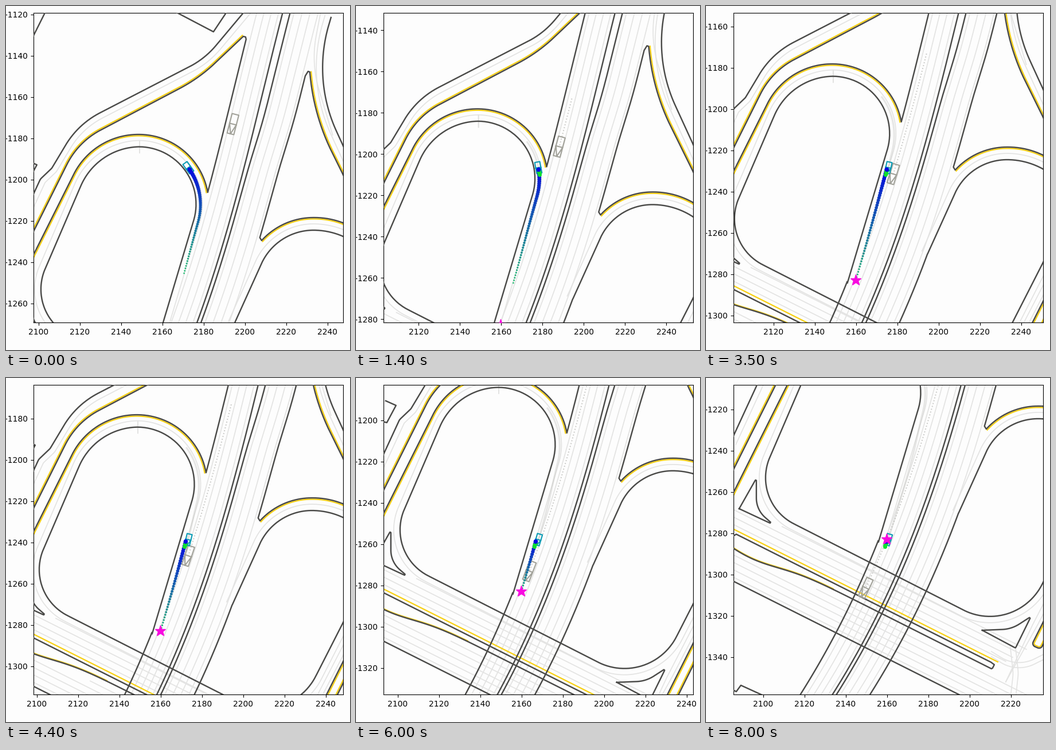
A matplotlib script that plays this animation: 600 px wide and 600 px high, repeating every 8100 ms.

```python
import numpy as np
import matplotlib.pyplot as plt
from matplotlib.animation import FuncAnimation

FRAMES, INTERVAL = 81, 100
SCALE, SPAN = 3.6, 75          # map units per metre, half view in metres
PAPER, EDGE, YELLOW, LANE = "#fdfdfd", "#4a4a48", "#f8d010", "#e3e3e2"


def world(points):
    """Map units (y down) to metres."""
    p = np.asarray(points, float)
    return np.stack([2084.17 + p[..., 0] / SCALE, -1115.87 - p[..., 1] / SCALE], -1)


def unit(v):
    return v / np.maximum(np.linalg.norm(v, axis=-1, keepdims=True), 1e-9)


def rounded(corners, radii):
    """Polyline whose inner corners are arcs of the given radii."""
    p = np.asarray(corners, float)
    out = [p[:1]]
    for a, b, c, r in zip(p, p[1:], p[2:], radii):
        d, e = unit(b - a), unit(c - b)
        turn = np.arctan2(d[0] * e[1] - d[1] * e[0], d @ e)
        n = np.sign(turn) * np.array([-d[1], d[0]])
        start = b - d * r * np.tan(abs(turn) / 2)
        th = np.linspace(0, abs(turn), 30)[:, None]
        out.append(start + r * (n * (1 - np.cos(th)) + d * np.sin(th)))
    p = np.vstack(out + [p[-1:]])
    s = np.r_[0, np.cumsum(np.hypot(*np.diff(p, axis=0).T))]
    t = np.linspace(0, s[-1], int(s[-1] / 2) + 2)
    return np.c_[np.interp(t, s, p[:, 0]), np.interp(t, s, p[:, 1])]


def offset(path, d):
    """Shift a path to the right of its direction of travel."""
    g = unit(np.gradient(path, axis=0))
    return path + np.reshape(d, (-1, 1)) * np.c_[-g[:, 1], g[:, 0]]


# The main road bends gently: its left median edge is a cubic in v.
MEDIAN = np.polyfit([12, 206, 404, 597, 872], [483, 433, 384, 315, 178], 3)


def road(v, shift=0):
    return np.c_[np.polyval(MEDIAN, v) + shift, v]


def right_road(v, shift=0):
    return road(v, 10 - 3 * np.tanh((v - 240) / 50) + shift)


def along(a, b):
    return np.linspace(a, b, int(abs(b - a) / 4) + 2)


def cross_road(x, height):
    return np.c_[x, height + 0.5025 * np.asarray(x)]


fig = plt.figure(figsize=(6, 6), dpi=100, facecolor=PAPER)
ax = fig.add_axes([0.08, 0.08, 0.9, 0.9], facecolor=PAPER)


def line(path, color, width, z, **kw):
    return ax.plot(*world(path).T, color=color, lw=width, zorder=z, **kw)[0]


def edge(*paths):
    line(np.vstack(paths), EDGE, 1.75, 3)


def stripe(path):
    line(path, YELLOW, 1.6, 2)


def lane(path):
    line(path, LANE, 1.2, 1)


# Ramps and loops
ramp_out = rounded([(0, 432), (60, 302), (80, 283), (126, 206), (347, 92), (430, -7)],
                   [15, 15, 150, 150])
ramp_in = rounded([(0, 490), (126, 237), (337, 126), (414, 53)], [137, 280])
loop_out = rounded([(0, 530), (153, 224), (333, 224), (352, 325)], [126, 122])
loop_in = rounded([(258, 606), (366, 245.5), (160, 245.5), (35, 536), (497, 771),
                   (630, 510)], [100, 113, 90, 102])
exit_in = rounded([(530, 115), (538, 193), (625, 369)], [385])
exit_out = rounded([(567, 20), (535, 128), (625, 324)], [265])
east_out = rounded([(446, 409), (482, 369), (596, 369), (650, 423)], [122, 140])
east_in = rounded([(398, 555), (472, 391), (590, 391), (640, 441)], [100, 130])

edge(ramp_out)
edge(loop_out, road(along(322, 58), -52), [(418, 54)], ramp_in[::-1])
edge(loop_in)
edge(exit_in[::-1], [(527, 114)], right_road(along(122, 404), 54), east_out)
edge(exit_out)
edge(right_road(along(890, 556), 58.5), east_in)
for path, d in ((ramp_in, -2.4), (loop_out, 2.4), (exit_in, -2.4), (east_out, 2.4)):
    stripe(offset(path, d))
for path, d in ((ramp_out, 10), (loop_in, 11), (exit_out, 11), (east_in, -11)):
    lane(offset(path, d))

# Main road
whole = along(-10, 900)
edge(road(whole))
edge(right_road(whole))
edge(road(along(604, 900), -56))
for k in range(4):
    lane(road(whole, -7 - 12.7 * k))
    lane(right_road(whole, 7 + 14 * k))
lane(rounded([(552, -5), (532, 100), (570, 225)], [200]))

# Cross road, with a median that swells on the left
x = along(455, -12)
swell = 18 * np.exp(-((x - 30) / 75) ** 2)
back = cross_road(x, 598.5 + swell)
edge([(-12, 605)], cross_road([10, 454], 587.5), [(460, 820), (457, 826)], back)
edge(cross_road([-10, 430], 672))
stripe(cross_road([-10, 466], 581))
line(back[x < 180] - [0, 1.6], YELLOW, 1, 2)
for k in range(5):
    lane(cross_road([-8 if k < 4 else 150, 500 + 10 * k], 665 - 13 * k))
    if k < 4:
        lane(cross_road([0 if k < 3 else 90, 480 + 12 * k], 573 - 13 * k))
for dx in (0, 9):
    lane(rounded([(488 + dx, 790), (493 + dx, 835), (488 + dx, 880)], [60]))
    lane(rounded([(615 + dx, 580), (528 + dx, 748), (480, 850)], [200]))
    lane(rounded([(455, 797 + dx), (500, 825 + dx), (550, 800 + dx)], [60]))

# Islands and fragments
bay = rounded([(630, 577), (525, 786), (541, 793), (630, 614)], [6, 6])
edge(bay)
stripe(offset(bay, -2.4))
edge(rounded([(15, 548), (45, 495), (45, 550), (75, 576), (15, 548)], [1, 45, 1]))
edge(rounded([(439, 760), (490, 758), (524, 736), (497, 791), (439, 760)], [60, 1, 1]))
edge([(36, 269), (54, 277), (38, 307), (18, 302)])
edge([(48, 52), (78, -8)])
edge([(280, 2), (362, 45), (392, 0)])
edge([(-5, 860), (10, 867), (18, 856), (75, 882)])

# Motion: the car leaves the loop while the truck keeps a steady speed
t = np.arange(FRAMES)
progress = 282 + 2.933 * t + 0.0191 * t ** 2 - 0.000072 * t ** 3
merge = loop_in[:np.argmin(loop_in[:, 1])]


def follow(v, drift):
    """Points at height v, off the merge edge by a drift that depends on v."""
    p = offset(merge, drift(merge[:, 1]))[::-1]
    return np.c_[np.interp(v, p[:, 1], p[:, 0]), v]


ego_path = follow(progress, lambda v: 11.3 + 4 * np.tanh((v - 410) / 50))
plan_path = follow(progress + 3, lambda v: 10 + 3 * np.tanh((v - 450) / 100))
truck_path = road(206 + 6 * t, -38.5 - 0.05 * t)
ego_dir, truck_dir = (unit(np.gradient(p, axis=0)) for p in (ego_path, truck_path))
goal = world((272, 601))


def vehicle(center, ahead, length, width):
    """Outline with a heading triangle in the front half."""
    side = np.array([-ahead[1], ahead[0]])
    shape = np.array([(0, 1), (1, 1), (1, -1), (-1, -1), (-1, 1), (0, 1),
                      (1, 0), (0, -1), (0, 1)]) / 2
    return world(center + shape[:, :1] * length * ahead + shape[:, 1:] * width * side)


ego_trail = line(ego_path[:1], "#b4b4b0", 2.2, 2, alpha=0.3)
truck_trail = line(truck_path[:1], "#a8a8a4", 1.4, 2, alpha=0.6, ls=":")
truck_box = line(truck_path[:1], "#a2a29a", 1.5, 4)
ego_box = line(ego_path[:1], "#0b9cb5", 1.5, 5)
plan = ax.scatter([], [], linewidths=0, zorder=6)
steps = ax.scatter([], [], s=26, color="#10e030", linewidths=0, zorder=7)
head = ax.scatter([], [], s=30, color="#0808e0", linewidths=0, zorder=8)
ax.plot(*goal, "*", color="#f80ae0", ms=14, zorder=9)


def update(n):
    center, ahead = ego_path[n], ego_dir[n]
    x, y = world(center)
    ax.set_xlim(x - SPAN, x + SPAN)
    ax.set_ylim(y - SPAN, y + SPAN)

    ego_trail.set_data(*world(ego_path[:n + 1]).T)
    truck_trail.set_data(*world(truck_path[:n + 1]).T)
    ego_box.set_data(*vehicle(center, ahead, 20, 9).T)
    truck_box.set_data(*vehicle(truck_path[n], truck_dir[n], 35, 12).T)

    future = plan_path[n:n + 50]
    f = np.linspace(0, 1, len(future))
    plan.set_offsets(world(future))
    plan.set_sizes((5.2 - 3.2 * f) ** 2)
    plan.set_facecolor(np.c_[0.02 + 0.14 * f, 0.03 + 0.72 * f, 0.88 - 0.42 * f])
    head.set_offsets(world(future[:1]))

    reach = np.linspace(3, 9, 4)[:, None]
    steps.set_offsets(world(future[0] + reach * ahead) if n else np.empty((0, 2)))
    return ()


anim = FuncAnimation(fig, update, frames=FRAMES, interval=INTERVAL,
                     repeat=True, repeat_delay=0)
plt.show()
```
